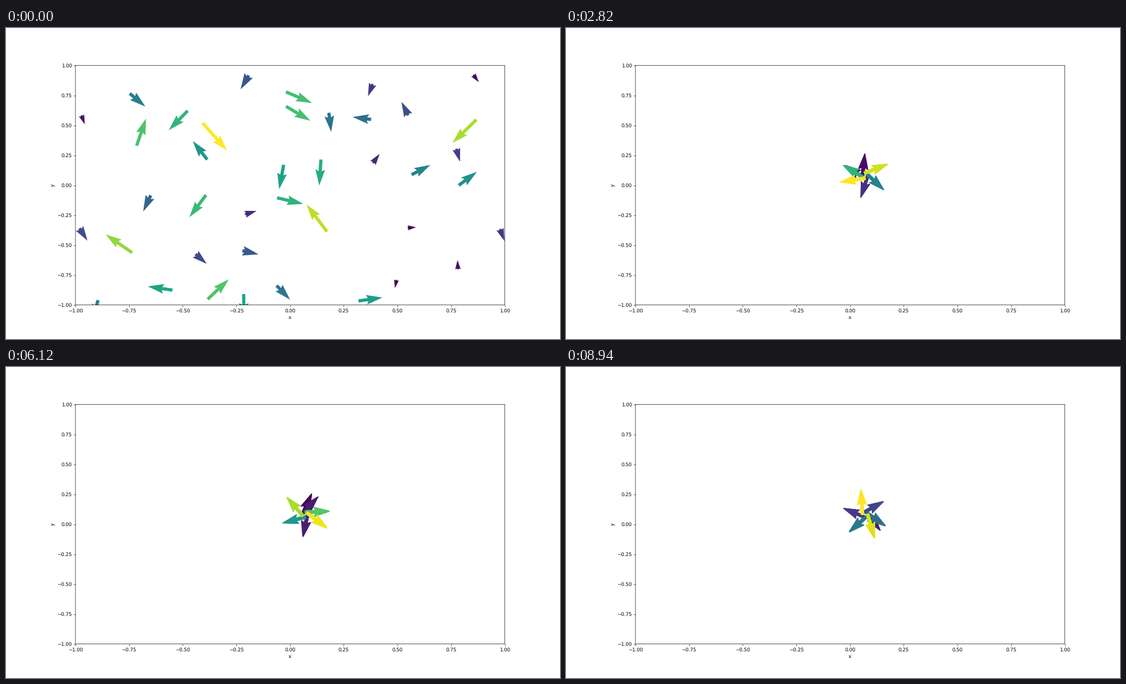
Recreate the animation shown at these times as a matplotlib script. Size 998 by 561 pixels, loop 9 s.

```python
import numpy as np
import matplotlib.pyplot as plt
from matplotlib.animation import FuncAnimation

W, H, DPI = 998, 561, 62.375
FRAMES, STEP = 150, 60
N = 40                   # arrows
SETTLE = 16              # frames until the swarm has gathered
MEAN_LEN = 43            # mean arrow length in pixels
RING = 4.5               # radius of the small clockwise orbit
CENTRE = np.array([538.5, 266.0])
FLIP = np.array([1, -1])

# The longest arrows at the start: tail, then tip, in pixels with y down.
LEADERS = np.array([
    (354, 171, 398, 221), (578, 367, 541, 318), (847, 165, 804, 207),
    (227, 405, 179, 372), (235, 212, 252, 163), (363, 489, 401, 453),
    (504, 115, 551, 135), (504, 141, 548, 167), (327, 149, 293, 184),
    (360, 301, 330, 341), (567, 237, 564, 284), (488, 306, 535, 317)], float)

rng = np.random.default_rng(12)


def scatter():
    """Tails and vectors at the start; the small arrows fill the free space."""
    tails = list(LEADERS[:, :2])
    vectors = list((LEADERS[:, 2:] - LEADERS[:, :2]) * FLIP)
    while len(tails) < N:
        tries = rng.uniform((130, 72), (893, 495), (6, 2))
        room = [min(np.hypot(*(p - q)) for q in tails) for p in tries]
        tails.append(tries[np.argmax(room)])
        size, turn = rng.uniform(13, 47), rng.uniform(0, 2 * np.pi)
        vectors.append(size * np.array([np.cos(turn), np.sin(turn)]))
    return np.array(tails), np.array(vectors)


START_TAILS, START_VECTORS = scatter()
arm = np.arange(N) % 7
wobble = rng.normal(0, 0.01, N)
shift = rng.normal(0, 0.3, (N, 2))


def arms(frame):
    """Angle in degrees and speed (0 to 1) of the star's seven arms."""
    drift = -0.0066 * (frame - 66) ** 2
    swing = -np.cos(2 * np.pi * (frame - 23) / 44)
    first = 197 + drift + (180 if frame > 100 else 0)
    angle = first + 64 * np.arange(6)
    axis = -5 + 1.4 * drift + 20 * swing
    speed = 0.5 + 0.5 * np.cos(2 * np.radians(angle - axis))
    stray = 90 + 2 * drift + 70 * swing
    return np.append(angle, stray), np.append(speed, 0.08)


def star(frame):
    """Tails, vectors (pixels, y up) and colours of the gathered swarm."""
    angle, speed = arms(frame)
    reach = (40 + 7 * speed)[arm]
    heading = np.radians(angle)[arm] - np.arcsin(RING / reach) + wobble
    length = np.sqrt(reach ** 2 - RING ** 2)
    cos, sin = np.cos(heading), np.sin(heading)
    tails = CENTRE + shift + RING * np.column_stack([-sin, -cos])
    return tails, length[:, None] * np.column_stack([cos, sin]), speed[arm]


def by_length(vectors):
    size = np.hypot(*vectors.T)
    return (size - size.min()) / np.ptp(size)


HOME = star(0)[0]


def swarm(frame):
    tails, vectors, colour = star(frame)
    if frame < SETTLE:
        rest = 0.72 ** SETTLE
        gap = (0.72 ** frame - rest) / (1 - rest)
        tails = tails + (START_TAILS - HOME) * gap
        inward = (CENTRE - tails) * FLIP
        dist = np.hypot(*inward.T)[:, None]
        pull = inward / dist * np.clip(MEAN_LEN * dist / dist.mean(), 12, 75)
        near = np.clip(dist / 60, 0, 1)
        keep = 0.45 ** frame
        vectors = keep * START_VECTORS + (1 - keep) * (
            near * pull + (1 - near) * vectors)
        mix = frame / SETTLE
        colour = (1 - mix) * by_length(vectors) + mix * colour
    order = np.argsort(colour, kind="stable")
    return tails[order], vectors[order], colour[order]


def to_data(p):
    x = (p[:, 0] / W - 0.125) / 0.775 * 2 - 1
    y = (1 - p[:, 1] / H - 0.11) / 0.77 * 2 - 1
    return np.column_stack([x, y])


# Soft, unsnapped lines and unhinted text.
plt.rcParams.update({"font.family": "DejaVu Sans", "path.snap": False,
                     "text.hinting": "none"})
fig = plt.figure(figsize=(W / DPI, (H + 0.001) / DPI), dpi=DPI,
                 facecolor="white")
ax = fig.add_axes([0.125 + 0.3 / W, 0.11 - 0.3 / H, 0.775, 0.77])
ax.set(xlim=(-1, 1), ylim=(-1, 1), xlabel="x", ylabel="y",
       xticks=np.linspace(-1, 1, 9), yticks=np.linspace(-1, 1, 9))

tails, vectors, colour = swarm(0)
arrows = ax.quiver(*to_data(tails).T, *vectors.T, colour, cmap="viridis",
                   clim=(0, 1), angles="uv", scale_units="dots", scale=1,
                   units="width", width=0.0075)


def update(frame):
    tails, vectors, colour = swarm(frame)
    arrows.set_offsets(to_data(tails))
    arrows.set_UVC(*vectors.T, colour)
    return arrows,


anim = FuncAnimation(fig, update, frames=FRAMES, interval=STEP,
                     repeat=True, repeat_delay=0)
plt.show()
```
